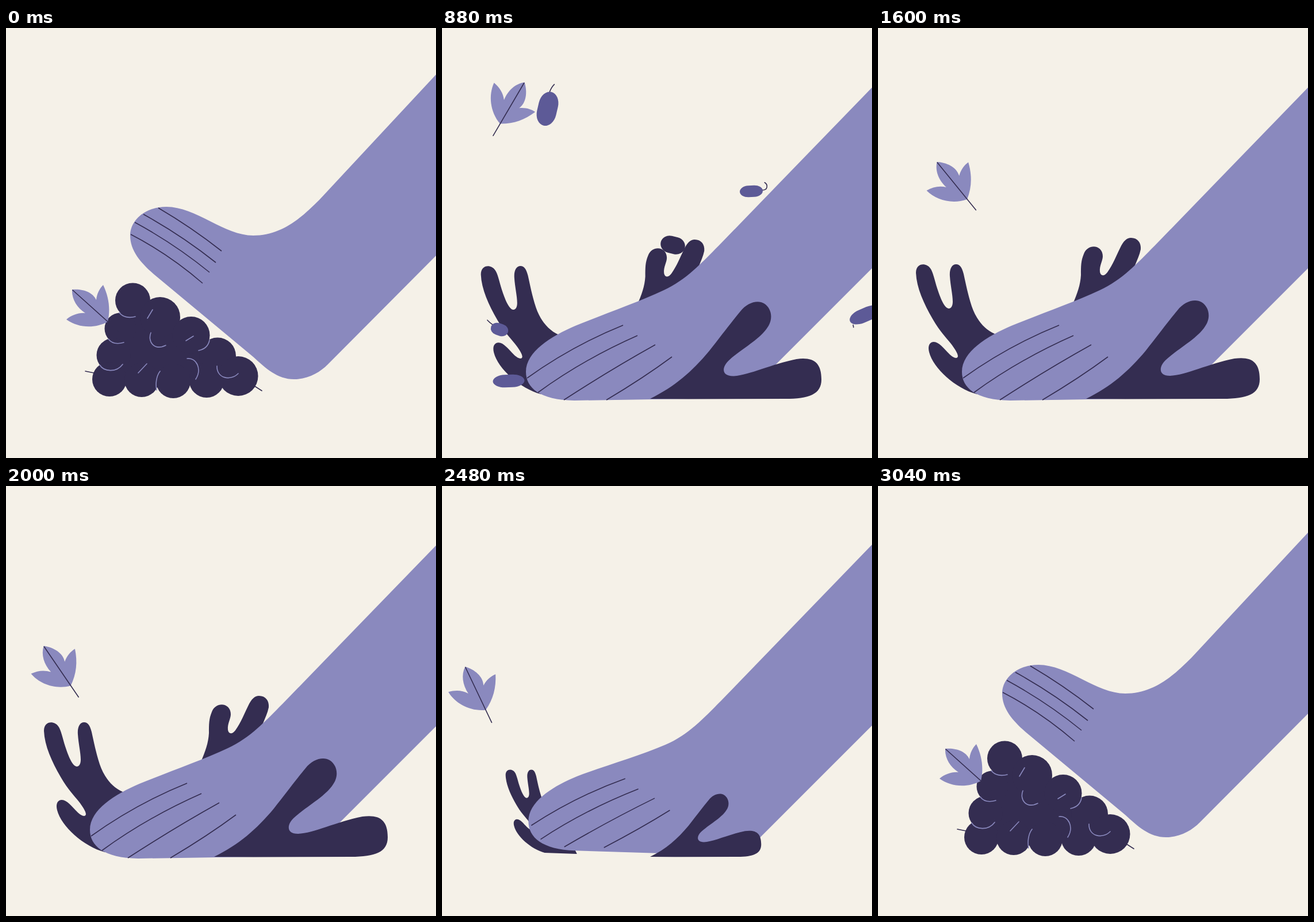
An HTML page that plays this animation: 748 px wide and 748 px high, repeating every 3.08 s.

```html
<!DOCTYPE html>
<html lang="en">
<head>
<meta charset="utf-8">
<title>Grape stomp</title>
<style>
  html, body { margin: 0; width: 100%; height: 100%; overflow: hidden; background: #f5f1e8; }
  svg { display: block; width: 100vw; height: 100vh; }
  .skin { fill: #8a89be; }
  .dark { fill: #342d51; }
  .berry { fill: #5d5a97; }
  .ink, .shine { fill: none; stroke-width: 1.6; stroke-linecap: round; }
  .ink { stroke: #342d51; }
  .shine { stroke: #8a89be; }
</style>
</head>
<body>
<svg viewBox="0 0 748 748">
  <g id="grapes">
    <path class="ink" d="M138 597L153 600M431 622L445 631"/>
    <g class="dark">
      <path d="M220 474L268 490L322 530L368 565L404 605L349 612L180 611L187 568L199 523Z"/>
      <circle cx="220.500" cy="474" r="30.500"/>
      <circle cx="268" cy="503" r="35"/>
      <circle cx="199" cy="523" r="27.500"/>
      <circle cx="322" cy="534.500" r="32.500"/>
      <circle cx="187" cy="569" r="29.500"/>
      <circle cx="368" cy="570.500" r="32"/>
      <circle cx="404" cy="605.500" r="34.500"/>
      <circle cx="180" cy="611" r="30"/>
      <circle cx="236" cy="612" r="30"/>
      <circle cx="291" cy="614" r="30"/>
      <circle cx="349" cy="612.500" r="30.500"/>
    </g>
    <path class="shine" d="M197 495C203 503 214 505 225 502M255 490L246 505M178 541C185 550 195 550 205 547
      M163 586C170 598 192 600 203 585M252 530C246 545 257 562 278 552M313 544L326 536M354 543C352 553 345 559 335 561
      M245 584L230 600M315 575C332 573 341 594 330 611M268 597C261 606 260 620 262 630M367 588C366 609 390 615 404 601"/>
  </g>
  <g id="pulp">
    <path class="dark" d="M190 458C210 460 226 474 241 492C256 487 273 490 286 498L300 600L152 615C144 612 137 608 134 603
      C125 587 121 564 122 550C126 530 129 518 135 506C150 482 170 462 190 458Z"/>
    <path class="shine" d="M188 478C190 496 206 507 225 502M255 490L246 505M174 537C178 543 182 546 188 546"/>
  </g>
  <path id="splashLeft" class="dark" d="M208 534C187 527 171 508 163 484C156 462 153 446 149 428C146 416 142 411 136 411
    C128 411 124 420 125 432C126 448 130 464 130 476C130 484 127 488 123 488C115 487 108 468 103 453C98 437 96 425 91 418
    C84 408 66 408 66 426C67 452 80 480 95 506C107 527 118 538 126 548C133 557 139 566 139 571C138 577 130 573 124 567
    C114 557 106 546 97 546C90 546 86 553 89 564C96 592 135 627 172 637L260 640Z"/>
  <path id="splashMid" class="dark" d="M338 482C347 461 352 447 353 430C353 414 353 405 358 393C365 374 391 377 391 397
    C391 405 385 413 386 424C387 431 393 433 399 425C409 411 414 397 421 383C427 370 433 365 440 365C452 365 458 374 457 385
    C455 395 451 403 447 413L420 460L360 480Z"/>
  <g id="berries"></g>
  <path id="foot" class="skin"/>
  <path id="toes" class="ink" style="stroke-linecap:butt"/>
  <path id="splashFront" class="dark" d="M362 645C405 624 436 597 466 561C488 533 506 509 521 491C533 475 552 470 563 477
    C577 486 579 505 569 519C556 540 520 559 500 578C488 590 488 605 508 605C535 604 575 584 620 575C650 571 664 581 664 611
    C664 637 642 645 600 645L430 645.500Z"/>
  <g id="leaf">
    <path class="skin" d="M115 455C132 453 151 459 157 473C158 462 163 453 169 447C179 468 182 489 177 511
      C153 524 124 521 105 507C115 499 126 495 138 496C123 486 114 471 115 455Z"/>
    <path class="ink" d="M116 456L195 527"/>
  </g>
</svg>
<script>
const LOOP = 3080, STEP = 40;
const $ = id => document.getElementById(id);
const clamp = v => Math.min(1, Math.max(0, v));
const smooth = u => u < .5 ? 4 * u ** 3 : 1 - 4 * (1 - u) ** 3;
const show = (el, on) => el.setAttribute('visibility', on ? 'visible' : 'hidden');

const FOOT_UP = 'M760 68L545 299C515 329 480 361 430 361C380 361 330 311 279 311C243 311 216 334 216 361' +
  'C216 388 235 409 258 429L430 572C452 592 472 611 501 611C526 611 546 599 560 585L760 384Z';
const FOOT_DOWN = 'M760 91L481 379C451 409 425 438 386 456C341 477 281 498 232 518C190 536 146 563 146 598' +
  'C146 626 170 647 230 648L430 645C465 645 490 645 510 641C535 636 543 623 560 606L760 406Z';
const TOES_UP = 'M265 313Q323 347 375 388M239 324Q306 361 365 408M224 338Q294 376 354 425M217 359Q283 393 342 444';
const TOES_DOWN = 'M148 609Q226 553 315 517M167 634Q245 577 340 535M212 647Q292 595 371 551M286 647Q350 609 400 572';

// Blend two paths that share the same commands
function mix(a, b, p) {
  const to = b.match(/\d+/g);
  let i = 0;
  return a.replace(/\d+/g, n => (+n + (to[i++] - n) * p).toFixed(2) + ' ');
}

// time, stem x, stem y, turn
const LEAF = [
  [680, 177, 511, 0], [720, 152, 390, 22], [800, 118, 240, 58], [880, 101, 166.5, 78.5],
  [1020, 97, 92, 98], [1200, 104, 148, 72], [1400, 140, 232, 28], [1600, 155, 298, 9],
  [1720, 150, 310, 10], [2020, 110, 350, 14], [2320, 75, 387, 19.5], [2400, 74, 388, 21],
  [2760, 86, 398, 27.5], [2840, 98, 412, 24], [2960, 150, 470, 10], [3040, 179, 513, 0], [3080, 177, 511, 0]
];

function slope(keys, i, c) {
  const a = keys[i - 1], b = keys[i + 1];
  return a && b ? (b[c] - a[c]) / (b[0] - a[0]) : 0;
}

function along(keys, t, c) {
  if (t <= keys[0][0]) return keys[0][c];
  const i = keys.findIndex(k => k[0] >= t), a = keys[i - 1], b = keys[i];
  const d = b[0] - a[0], u = (t - a[0]) / d, v = 1 - u;
  return a[c] * (1 + 2 * u) * v * v + b[c] * u * u * (3 - 2 * u) +
    d * u * v * (slope(keys, i - 1, c) * v - slope(keys, i, c) * u);
}

// from, to (160 ms later), size, tilt, spin, gravity, stem
const BERRIES = [
  { from: [195, 520], to: [183.5, 140.5], size: [34, 60], tilt: 13, spin: 30, stem: 'M-3 -29Q-2 -38 2 -44' },
  { from: [380, 500], to: [538, 284], size: [40, 20], tilt: -3, spin: 40, stem: 'M19 -1C29 0 30 -10 24 -14' },
  { from: [560, 560], to: [736, 499], size: [57, 24], tilt: -23, spin: -30, stem: 'M-26 8L-27 12' },
  { from: [190, 575], to: [100, 524.5], size: [31, 21], tilt: 18, spin: -40, stem: 'M-13 -4Q-20 -6 -25 -9' },
  { from: [215, 625], to: [116, 614], size: [55, 22], tilt: -2, spin: 20 },
  { from: [400, 490], to: [401.5, 377.5], size: [43, 30], tilt: 14, spin: 10, gravity: 113, dark: true }
];

for (const b of BERRIES) {
  const [w, h] = b.size;
  const rx = w * (w > h ? .38 : .5), ry = h * (w > h ? .5 : .38);
  $('berries').insertAdjacentHTML('beforeend',
    `<g><path class="ink" d="${b.stem || ''}"/><rect class="${b.dark ? 'dark' : 'berry'}" x="${-w / 2}" y="${-h / 2}"
      width="${w}" height="${h}" rx="${rx}" ry="${ry}"/></g>`);
  b.el = $('berries').lastElementChild;
}

function scaleAt(id, x, y, sx, sy = sx) {
  $(id).setAttribute('transform', `translate(${x} ${y}) scale(${sx} ${sy}) translate(${-x} ${-y})`);
}

function drawFoot(t) {
  const p = t < 2400 ? clamp(t / 640) ** 8 : 1 - smooth(clamp((t - 2400) / 320));
  $('foot').setAttribute('d', mix(FOOT_UP, FOOT_DOWN, p));
  $('toes').setAttribute('d', mix(TOES_UP, TOES_DOWN, p));
}

function drawGrapes(t) {
  show($('grapes'), t < 640 || t > 2480);
  show($('pulp'), t >= 640 && t < 720);
  if (t < 640) {
    const q = clamp((t - 560) / 80);
    scaleAt('grapes', 290, 642, 1 + .12 * q, 1 - .08 * q);
  } else {
    scaleAt('grapes', 290, 642, 1 - (1 - clamp((t - 2480) / 200)) ** 3);
  }
}

function drawSplash(t) {
  const grow = 1 - 2 ** (-(t - 680) / 32);
  const k = clamp(grow) * (1 - clamp((t - 2360) / 200) ** 2);
  const on = t > 680 && k > 0;
  const roots = { splashLeft: [190, 640], splashMid: [400, 600], splashFront: [362, 645] };
  for (const id in roots) {
    show($(id), on);
    scaleAt(id, ...roots[id], k);
  }
}

function drawBerries(t) {
  const u = (t - 720) / 160;
  for (const { el, from, to, tilt, spin, gravity = 0 } of BERRIES) {
    const x = from[0] + (to[0] - from[0]) * u;
    const y = from[1] + (to[1] - from[1]) * u + gravity * (u * u - u);
    show(el, t > 720 && t < (gravity ? 1040 : 1160));
    el.setAttribute('transform', `translate(${x} ${y}) rotate(${tilt + spin * (u - 1)})`);
  }
}

function drawLeaf(t) {
  const [x, y, r] = [1, 2, 3].map(c => along(LEAF, t, c));
  $('leaf').setAttribute('transform', `translate(${x} ${y}) rotate(${r}) translate(-177 -511)`);
}

const start = performance.now();
function frame() {
  const elapsed = Math.max(0, performance.now() - start) % LOOP;
  const t = Math.floor(elapsed / STEP) * STEP;
  for (const draw of [drawFoot, drawGrapes, drawSplash, drawBerries, drawLeaf]) draw(t);
  requestAnimationFrame(frame);
}
frame();
</script>
</body>
</html>
```
